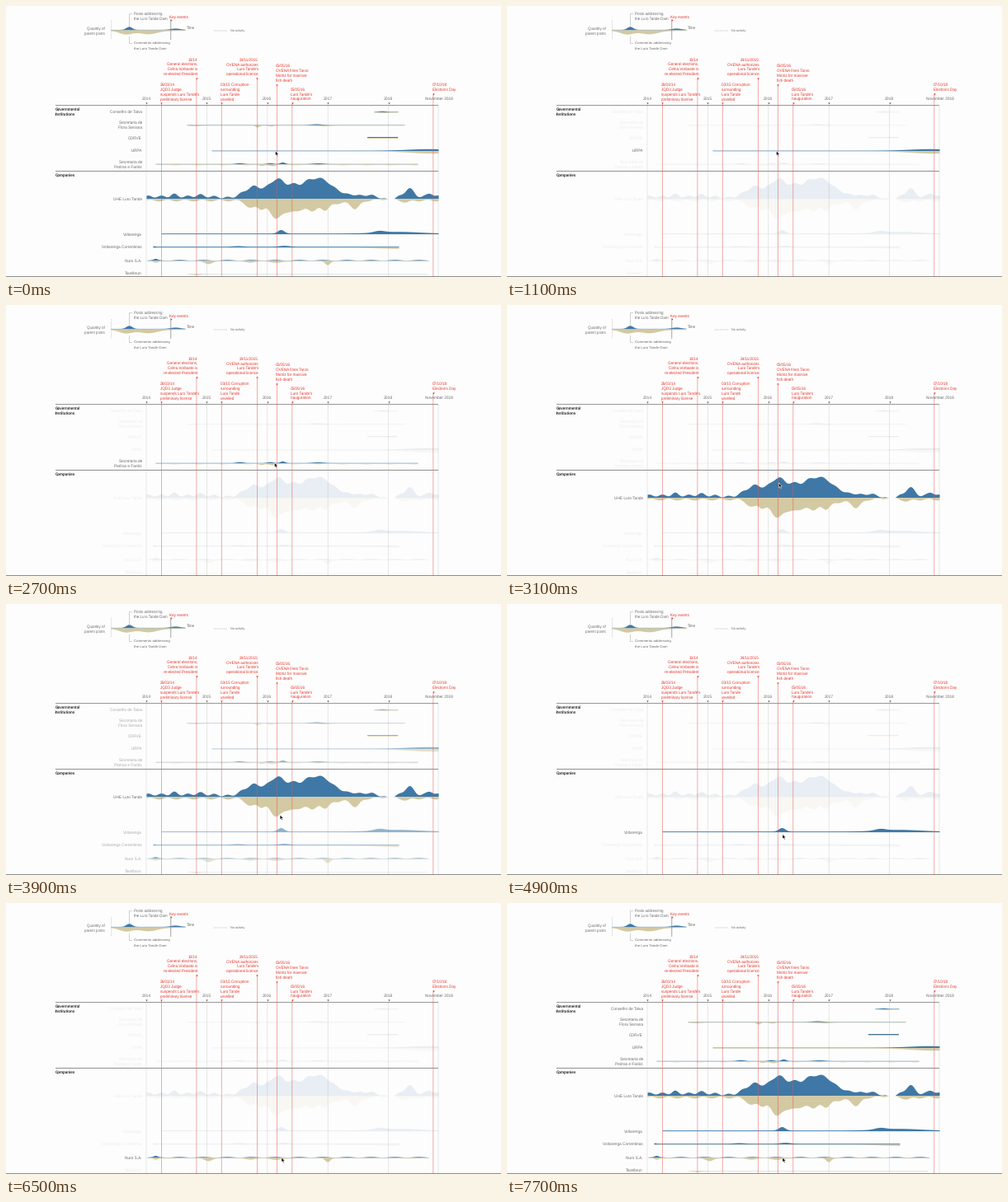
A matplotlib script for the animation above (7.8 s loop, 600x329 px).

```python
import numpy as np
import matplotlib.pyplot as plt
from matplotlib.animation import FuncAnimation
from matplotlib.patches import Polygon

W, H, DPI = 600, 329, 100
FRAMES, STEP = 78, 100
BLUE, TAN, RED = "#3f78a6", "#d3c9a2", "#e8342a"
GREY, INK = "#6c6c6c", "#262626"
FADED, FADE_FRAMES = 0.11, 2

plt.rcParams["font.family"] = "Liberation Sans"
plt.rcParams["text.hinting"] = "none"
plt.rcParams["toolbar"] = "None"

fig = plt.figure(figsize=(W / DPI, H / DPI), dpi=DPI, facecolor="#fdfdfd")
ax = fig.add_axes([0, 0, 1, 1])
ax.set_xlim(0, W)
ax.set_ylim(H, 0)
ax.axis("off")


def px(n):
    return n * 72 / DPI


def write(x, y, lines, size, color, ha="left", dy=5.85, weight="normal"):
    """Stack lines of text; y is the middle of the first line."""
    return [ax.text(x, y + i * dy + 0.36 * size, line, fontsize=px(size),
                    color=color, ha=ha, va="baseline", weight=weight, zorder=6)
            for i, line in enumerate(lines)]


def rule(xs, ys, color, width=0.8, alpha=1, z=2, style="-"):
    ax.plot(xs, ys, color=color, lw=px(width), alpha=alpha, zorder=z,
            ls=style, solid_capstyle="butt", snap=False)


def marker(x, y, size, color):
    ax.plot([x], [y], "v", ms=px(size), color=color, mew=0, zorder=5, snap=False)


def band(x, base, peaks=(), swing=0, period=1, crest=0):
    """Thickness: a gentle wave plus bell-shaped peaks (centre, width, height)."""
    wave = base + swing * np.cos(2 * np.pi * (x - crest) / period)
    bells = sum(h * np.exp(-((x - c) / w) ** 2) for c, w, h in peaks)
    return np.maximum(wave + bells, 0)


def stream(x0, x1, y, up, down):
    x = np.linspace(x0, x1, (x1 - x0) * 2 + 1)
    return [ax.fill_between(x, y, y - band(x, *up), color=BLUE, lw=0, zorder=3),
            ax.fill_between(x, y, y + band(x, *down), color=TAN, lw=0, zorder=3)]


# Legend
stream(127, 217, 29, (0.6, [(149, 5, 3.6), (205, 8, 1.5)]),
       (0.7, [(145, 11, 4.3), (172, 15, 4.1)]))
rule([127.5, 127.5], [17, 40], "#a8a8a8", 0.7, style=":")
for y_tip, y_text in ((25, 9.5), (37, 45.5)):
    rule([149.5, 149.5, 153], [y_tip, y_text, y_text], "#b5b5b5", 0.6)
rule([199.8, 199.8], [16, 41], "#8f8f8f", 0.8, z=4)
ax.plot([199.8], [17], "o", ms=px(1.6), color=RED, mew=0, zorder=5)
rule([252, 268], [30, 30], "#9a9a9a", 0.8, style=":")
write(155, 9, ["Posts addressing", "the Luro Tande Dam"], 4.5, GREY, dy=6.5)
write(155, 45, ["Comments addressing", "the Luro Tande Dam"], 4.4, GREY, dy=6)
write(120, 27, ["Quantity of", "parent posts"], 4.5, GREY, "right", 6.2)
write(198, 13, ["Key events"], 4.6, RED)
write(219, 26, ["Time"], 4.6, GREY)
write(272, 30, ["No activity"], 3.8, GREY)

# Time axis and section rules
YEARS = 170 + 73.4 * np.arange(5)
for i, year_x in enumerate(YEARS):
    write(year_x, 111.8, [str(2014 + i)], 5, GREY, "center")
    marker(year_x, 118, 2.2, "#555555")
write(525, 111.8, ["November 2018"], 4.8, GREY, "center")
for grid_x in [*YEARS, 524]:
    rule([grid_x] * 2, [121, H], "#dedede", 0.7, z=1)
for y in (120.7, 200.4):
    rule([60, 524], [y, y], "#757575", 0.8)
rule([0, W], [328.4, 328.4], "#7d7d7d", 0.9)
write(60, 125.5, ["Governmental", "Institutions"], 4.5, INK, dy=5.6, weight="bold")
write(60, 205, ["Companies"], 4.5, INK, weight="bold")

# Key events: line x, line top, text x, text y, alignment, lines
EVENTS = [
    (230.9, 88, 232, 65, "right", ["10/14", "General elections,", "Celna Vorbaste is",
                                   "re-elected President"]),
    (304.4, 88, 306, 65, "right", ["24/11/2015", "OVENA authorizes", "Luro Tande's",
                                   "operational licence"]),
    (328.4, 96, 327, 72.5, "left", ["05/05/16", "OVENA fines Tarvo",
                                    "Motriz for massive", "fish death"]),
    (188.4, 118, 187, 95.5, "left", ["26/03/14", "JQD3 Judge", "suspends Luro Tande's",
                                     "preliminary license"]),
    (261.3, 118, 260, 95.5, "left", ["03/15 Corruption", "surrounding", "Luro Tande",
                                     "unveiled"]),
    (346.8, 118, 345, 101, "left", ["05/05/16", "Luro Tande's", "inauguration"]),
    (517.8, 107, 517, 95.5, "left", ["07/10/18", "Elections Day"]),
]
for line_x, top, tx, ty, ha, lines in EVENTS:
    rule([line_x] * 2, [top, H], "#e2564d", 0.8, alpha=0.6, z=4)
    marker(line_x, top, 2.3, RED)
    write(tx, ty, lines, 4.65, RED, ha, 5.8)

# Streams: label, label y, baseline, x range, band above, band below
ROWS = [
    (["Conselho de Talva"], 128, 128.4, 446, 475,
     (0.5, [(456, 5, 0.7)]), (0.7, [(459, 6, 0.5)])),
    (["Secretaria de", "Flora Serrana"], 141.2, 144.3, 219, 483,
     (0.4, [(376, 9, 0.9)]),
     (0.5, [(229, 8, 0.6), (304.5, 3, 2.2), (321, 4, 1), (385, 9, 0.8)])),
    (["CORVE"], 160, 159.9, 438, 475, (1,), (1.2,)),
    (["LIRPA"], 175.7, 175.6, 249, 524,
     (0.5, [(512, 35, 1.8)]), (0.6, [(516, 35, 2.5)])),
    (["Secretaria de", "Pedras e Faróis"], 189.3, 191.8, 181, 499,
     (0.5, [(283, 6, 1), (320, 5, 1), (335, 4, 1.9), (378, 9, 0.8)]),
     (0.6, [(309, 4, 1.5), (323, 5, 1.3)], 0.35, 29, 262)),
    (["UHE Luro Tande"], 234, 233.7, 170, 524,
     (2.9, [(203, 5, 2.5), (234, 6, 2), (268, 12, -1.5), (300, 15, 12), (328, 13, 20.5),
            (349, 12, 12), (371, 14, 21), (387, 9, 14), (401, 8, 8), (418, 7, 3),
            (437, 8, 2), (463, 9, -4), (488, 7, 10), (514, 5, 4)], 1.2, 16, 204),
     (2, [(297, 9, 9), (309, 6, 8), (325, 9, 21), (341, 10, 14), (357, 10, 10),
          (371, 8, 11), (386, 7, 13), (403, 7, 5), (423, 7, 11), (463, 12, -2),
          (485, 6, 2.5)], 1.1, 21, 206)),
    (["Voltarenga"], 277, 276.6, 188, 524,
     (0.9, [(333, 5.5, 4.2), (452, 9, 2), (475, 35, 2)]), (0.1,)),
    (["Voltarenga Correntinas"], 292.5, 292.6, 178, 476,
     (0.9, [(179, 2, 0.6), (281, 8, 0.7), (337, 8, 1.1)]),
     (0.4, [(179, 2, 0.6), (474, 32, 1.3)])),
    (["Nuro S.A."], 309, 308.9, 171, 512,
     (0.7, [(181, 3, 1.4)], 0.4, 29, 181),
     (0.5, [(181, 4, 1.7), (245, 6, 3.2), (296, 7, 1.4), (326, 9, 2),
            (389.5, 4, 4.5)], 0.25, 49, 245)),
    (["Tavelbrun"], 324.5, 325, 220, 510, (0.12,), (0.15, [(231, 7, 0.9)])),
]
rows = [stream(x0, x1, y, up, down) + write(165, label_y, label, 4.75, GREY, "right", 6)
        for label, label_y, y, x0, x1, up, down in ROWS]

# Highlights: row, first and last moment including the fades
HOVERS = [(3, 5, 15), (4, 20, 30), (5, 29, 40), (6, 40, 51), (7, 52, 59), (8, 63, 67)]

# Pointer tip: moment, x, y
PATH = np.array([
    (13, 326.5, 176), (20, 325.3, 191), (28, 325.5, 191.5), (31, 329.3, 216),
    (43, 333.5, 276), (49, 334, 279.5), (57, 336.3, 299.5), (65, 334, 309)])
ARROW = np.array([(0, 0), (0, 5.6), (1.3, 4.5), (2.2, 6.6), (3.2, 6.2),
                  (2.3, 4.1), (4, 4)])
pointer = ax.add_patch(Polygon(ARROW, fc="black", ec="white", lw=px(0.5), zorder=9))


def draw(frame):
    levels = {row: np.clip(min(frame - start, end - frame) / FADE_FRAMES, 0, 1)
              for row, start, end in HOVERS}
    for i, parts in enumerate(rows):
        dim = max(level for row, level in levels.items() if row != i)
        for part in parts:
            part.set_alpha(1 - (1 - FADED) * dim)
    tip = [np.interp(frame, PATH[:, 0], PATH[:, k]) for k in (1, 2)]
    pointer.set_xy(ARROW + tip)
    return [pointer]


anim = FuncAnimation(fig, draw, frames=FRAMES, interval=STEP, repeat=True,
                     repeat_delay=0, blit=False)
plt.show()
```
